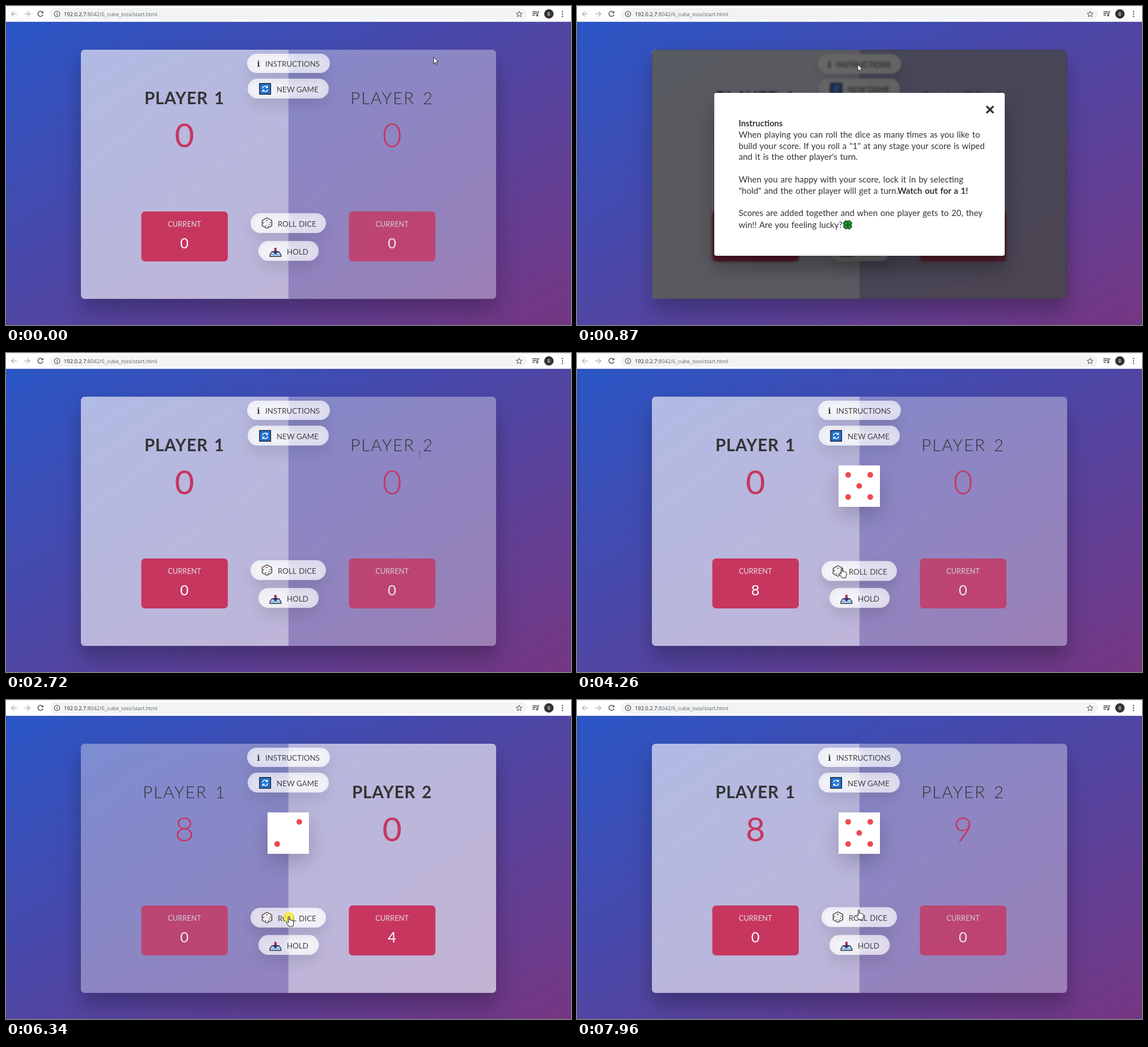
An HTML page for the animation above (8000 ms loop, 996 by 562 pixels).

```html
<!DOCTYPE html>
<html lang="en">
<head>
<meta charset="utf-8">
<title>Dice game</title>
<style>
html, body { margin: 0; width: 100%; height: 100%; overflow: hidden; }
#stage { position: relative; width: 996px; height: 562px; overflow: hidden; background: #fff; font-family: Lato, "Open Sans", sans-serif; }
#stage div, #stage svg { position: absolute; box-sizing: border-box; }
svg { overflow: visible; pointer-events: none; }
svg text { white-space: pre; }
.full { left: 0; top: 0; width: 996px; height: 562px; }
#page { left: 0; top: 28px; width: 996px; height: 534px; background: linear-gradient(to top left, #753682, #2a56c6); }
#main { left: 131.5px; top: 77px; width: 732px; height: 439px; overflow: hidden; border-radius: 6.6px;
  background: rgba(255,255,255,.35); backdrop-filter: blur(146px); }
#shade { left: 131.5px; top: 77px; width: 732px; height: 439px; border-radius: 6.6px; box-shadow: 0 22px 36.6px rgba(0,0,0,.25); }
.panel { top: 0; width: 366px; height: 439px; }
.btn { border-radius: 40px; background: rgba(255,255,255,.6); backdrop-filter: blur(7.3px); }
.btn text { font-size: 13.4px; fill: #444; }
#dice { left: 329.5px; top: 120.5px; width: 73px; height: 73px; background: #fff; box-shadow: 0 14.6px 36.6px rgba(0,0,0,.2); }
#overlay { inset: 0; background: rgba(0,0,0,.6); backdrop-filter: blur(2.2px); }
#modal { left: 110px; top: 76px; width: 512px; height: 287px; border-radius: 3.7px; background: #fff; box-shadow: 0 22px 36.6px rgba(0,0,0,.3); }
#modal text { font-size: 15px; word-spacing: 1px; fill: #333; }
.b { font-weight: 700; }
.name { font-size: 29.6px; fill: #333; text-anchor: middle; }
.score { font-size: 59px; fill: #c7365f; text-anchor: middle; }
.label { font-size: 12.8px; fill: #ddd; text-anchor: middle; }
.now { font-size: 25.6px; fill: #fff; text-anchor: middle; }
</style>
</head>
<body>
<div id="stage"></div>
<script>
const stage = document.getElementById('stage');
const $ = id => document.getElementById(id);

// Layers keep stage coordinates whatever box they sit in.
const layer = (x, y, body, id = '') =>
  `<svg id="${id}" class="full" style="left:${-x}px;top:${-y}px" viewBox="0 0 996 562">${body}</svg>`;
const text = (x, y, s, attrs = '') => `<text x="${x}" y="${y}" ${attrs}>${s}</text>`;
const dot = (x, y, r, fill) => `<circle cx="${x}" cy="${y}" r="${r}" fill="${fill}"/>`;

const toolbar = `
  <path d="M0 .5H996" stroke="#e4e6e8"/><path d="M0 27.5H996" stroke="#dfe1e5"/>
  <rect x="77" y="3.5" width="841" height="20.5" rx="10.2" fill="#f1f3f4"/>
  <g fill="none" stroke="#b4b7ba" stroke-width="1.4">
    <path d="M19 14H9.6M14 9.4L9.4 14L14 18.6"/><path d="M32.500 14H42M37.500 9.400L42.100 14L37.500 18.600"/>
  </g>
  <g fill="none" stroke="#4d5156" stroke-width="1.400">
    <path d="M64.300 10.900A4.500 4.500 0 1 0 65.200 15"/><path d="M65.800 8.800V12.800H61.800Z" fill="#4d5156" stroke="none"/>
    <circle cx="90" cy="14" r="4.800" stroke-width="1.100"/><path d="M90 13.300V16.700M90 11.200V12.400" stroke-width="1.200"/>
    <path d="M904.500 9L906 12.500L909.700 12.800L906.900 15.200L907.800 18.800L904.500 16.900L901.200 18.800L902.100 15.200L899.300 12.800L903 12.500Z" stroke-width="1"/>
    <path d="M928 10.300H936M928 13.300H936M928 16.300H932.500M937.500 16.500V10.300H940"/>
  </g>
  ${dot(936.2, 16.700, 1.700, '#4d5156')}
  <text x="102" y="17.500" font-family="Open Sans, Noto Sans, sans-serif" font-size="9.300" fill="#5f6368"><tspan fill="#202124">192.0.2.7</tspan>:8042/6_cube_toss/start.html</text>
  ${dot(957, 14, 8.300, '#333')}
  <text x="957" y="16.800" font-size="7.500" fill="#fff" text-anchor="middle">B</text>
  ${[9.8, 14, 18.2].map(y => dot(981, y, 1.200, '#4d5156')).join('')}`;

const icons = {
  info: `<text x="442.500" y="107" style="font:700 15px 'Noto Serif',serif;fill:#333">i</text>`,
  reload: `<rect x="447" y="136.500" width="19.500" height="19" fill="#2173d4" stroke="#111" stroke-width="1.300"/>
    <g fill="none" stroke="#fff" stroke-width="1.400"><path d="M452 145A4.800 4.800 0 0 1 460.500 143.200M461.500 147A4.800 4.800 0 0 1 453 148.900"/>
    <path d="M461 140.500V143.800H457.700M452.500 151.600V148.300H455.800"/></g>`,
  die: `<path d="M460 373.300L468.500 377.800V387.200L460 391.800L451.600 387.200V377.800Z" fill="#fff" stroke="#222" stroke-width="1.300" stroke-linejoin="round"/>
    <path d="M451.600 377.800L460 382.300L468.500 377.800M460 382.300V391.800" fill="none" stroke="#aaa" stroke-width=".6"/>
    ${dot(460, 377.800, 1.300, '#d22')}
    ${[[454, 382], [457.500, 387.500], [462.500, 388], [466, 381.500], [464.300, 384.800]].map(p => dot(...p, .9, '#222')).join('')}`,
  tray: `<path d="M468.500 433H481.500L484.800 438V441.300H465.200V438Z" fill="#a9d3f5" stroke="#222" stroke-width="1.300" stroke-linejoin="round"/>
    <path d="M466 438.300H484" stroke="#6fa6d8"/>
    <path d="M473.300 426.500H476.700V432.500H479.800L475 437.500L470.200 432.500H473.300Z" fill="#4a2a86" stroke="#222" stroke-width=".6"/>
    <path d="M473.300 426.500H476.700V431H473.300Z" fill="#cf2d4c"/>`
};

const buttons = {
  info: [424.5, 84, 146, 34, icons.info + text(457, 107, 'INSTRUCTIONS')],
  fresh: [426, 128, 143, 35, icons.reload + text(477, 152, 'NEW GAME')],
  roll: [431, 364.7, 133, 35, icons.die + text(479, 388.5, 'ROLL DICE', 'word-spacing="1.500"')],
  hold: [444.5, 414.4, 106.5, 35, icons.tray + text(495, 438.300, 'HOLD')]
};

const button = ([id, [x, y, w, h, body]]) =>
  `<div class="btn" id="${id}" style="left:${x - 131.5}px;top:${y - 77}px;width:${w}px;height:${h}px">${layer(x, y, body)}</div>`;

const player = i => {
  const x = 314.5 + 366 * i;
  return text(x, 172.500, `PLAYER ${i + 1}`, `class="name" id="name${i}"`)
    + text(x, 248.700, 0, `class="score" id="score${i}"`)
    + `<g id="box${i}"><rect x="${x - 76}" y="362" width="152.500" height="88" rx="6.600" fill="#c7365f"/>`
    + text(x, 389, 'CURRENT', 'class="label"')
    + text(x, 427, 0, `class="now" id="now${i}"`) + '</g>';
};

const lines = [
  [212, '<tspan class="b" font-size="14.600">Instructions</tspan>'],
  [231.7, 'When playing you can roll the dice as many times as you like to'],
  [251.5, 'build your score. If you roll a "1" at any stage your score is wiped'],
  [271.2, "and it is the other player's turn."],
  [310.7, 'When you are happy with your score, lock it in by selecting'],
  [330.5, '"hold" and the other player will get a turn. <tspan class="b" x="565">Watch out for a 1!</tspan>'],
  [370, 'Scores are added together and when one player gets to 20, they'],
  [391, 'win!! Are you feeling lucky?']
];

const leaf = a => `<path transform="translate(477 385.500) rotate(${a})" d="M0 0C-4-2-5-5-3.500-7C-2-8.700-.5-7.800 0-7C.5-7.800 2-8.700 3.500-7C5-5 4-2 0 0Z" fill="#1e8f2e" stroke="#143d18" stroke-width="1"/>`;

const modalBody = lines.map(([y, s]) => text(285, y, s)).join('')
  + `<path d="M477 385.500Q478 391 481 393.500" fill="none" stroke="#143d18" stroke-width="1.500"/>`
  + [45, 135, 225, 315].map(leaf).join('')
  + `<path d="M721.800 176.500L734.200 188.500M734.200 176.500L721.800 188.500" stroke="#333" stroke-width="3.200"/>
     <rect id="focus" x="717" y="162" width="22.500" height="42.500" rx="2" fill="none" stroke="#101010" stroke-width="2"/>`;

const cursors = `
  <circle id="click" r="9.300" fill="#f7e93a" opacity=".88"/>
  <g id="cursor" stroke="#111" stroke-linejoin="round">
    <path id="arrow" d="M0 0V11.500L2.700 9.100L4.600 13.300L6.500 12.500L4.700 8.400H8Z" fill="#fff" stroke-width=".9"/>
    <path id="hand" d="M-1.200 .8C-1.200-.6 1-.6 1 .8V6C1.200 5 3.400 5 3.600 6.400C4.200 5.600 5.800 6 6 7.200C6.800 6.600 8 7 8 8.400V12L6.600 17H0L-4.600 10.600C-5.400 9.200-3.800 8-2.600 9.200L-1.200 10.600Z" fill="#fff" stroke-width="1"/>
    <path id="beam" d="M-2-6H2M0-6V6M-2 6H2" fill="none" stroke="#555" stroke-width=".8"/>
  </g>`;

stage.innerHTML = `<div id="page"></div><div id="shade"></div>
  <div id="main">
    <div class="panel" id="panel0" style="left:0"></div><div class="panel" id="panel1" style="left:366px"></div>
    ${layer(131.5, 77, player(0) + player(1))}
    <div id="dice">${layer(461, 197.5, '', 'pips')}</div>
    ${Object.entries(buttons).map(button).join('')}
    <div id="overlay"></div>
    <div id="modal">${layer(241.5, 153, modalBody)}</div>
  </div>
  ${layer(0, 0, toolbar)}${layer(0, 0, cursors)}`;

const LOOP = 8000;
const clamp = v => Math.min(1, Math.max(0, v));
const mix = (a, b, k) => a + (b - a) * k;

// The CSS "ease" curve, cubic-bezier(.25, .1, .25, 1).
function ease(x) {
  x = clamp(x);
  let lo = 0, hi = 1;
  for (let i = 0; i < 20; i++) {
    const s = (lo + hi) / 2, bx = .75 * s * (1 - s) + s ** 3;
    if (bx < x) lo = s; else hi = s;
  }
  return .3 * lo * (1 - lo) ** 2 + 3 * lo * lo * (1 - lo) + lo ** 3;
}

const clicks = [
  ['info', 780, 850], ['close', 2630, 2715], ['roll', 3490, 3640], ['roll', 4100, 4225], ['hold', 4630, 4670],
  ['roll', 5490, 5600], ['roll', 5900, 6010], ['roll', 6290, 6410], ['hold', 6970, 7030]
];

// time, active player, totals, current scores, die face
const states = [
  [0, 0, [0, 0], [0, 0], 0], [3640, 0, [0, 0], [3, 0], 3], [4225, 0, [0, 0], [8, 0], 5],
  [4670, 1, [8, 0], [0, 0], 5], [5600, 1, [8, 0], [0, 2], 2], [6010, 1, [8, 0], [0, 4], 2],
  [6410, 1, [8, 0], [0, 9], 5], [7030, 0, [8, 9], [0, 0], 5]
];

const path = [
  [0, 754, 90], [70, 754, 90], [380, 495, 105], [850, 495, 105], [870, 495, 103], [1800, 495, 103],
  [2490, 728, 179], [2720, 729, 179], [2790, 729, 179], [3410, 467, 380], [4225, 467, 379], [4270, 467, 379],
  [4410, 469, 418], [4700, 469, 418], [5300, 499, 382], [6410, 499, 382], [6520, 499, 382],
  [6800, 499, 424], [7500, 499, 424], [7960, 497, 370], [LOOP, 497, 370]
];

function cursorAt(t) {
  const i = Math.max(1, path.findIndex(p => p[0] > t));
  const [t0, x0, y0] = path[i - 1], [t1, x1, y1] = path[i];
  const k = clamp((t - t0) / (t1 - t0)), s = k * k * (3 - 2 * k);
  return [mix(x0, x1, s), mix(y0, y1, s)];
}

const inside = (x, y, [bx, by, w, h]) => x >= bx && x <= bx + w && y >= by && y <= by + h;

function cursorKind(x, y, open) {
  if (open) {
    if (inside(x, y, [717, 162, 23, 43])) return 'hand';
    return inside(x, y, [285, 197, 425, 200]) ? 'beam' : 'arrow';
  }
  if (Object.values(buttons).some(b => inside(x, y, b))) return 'hand';
  return inside(x, y, [610, 142, 140, 40]) || inside(x, y, [664, 195, 32, 70]) ? 'beam' : 'arrow';
}

function pressAt(id, t) {
  const c = clicks.filter(c => c[0] === id && c[1] <= t).pop();
  if (!c) return 0;
  const down = ease((Math.min(t, c[2]) - c[1]) / 200);
  return t < c[2] ? down : down * (1 - ease((t - c[2]) / 200));
}

const pips = n => {
  const at = [[-1, 1], [1, -1], [-1, -1], [1, 1]].slice(0, n & ~1);
  if (n & 1) at.push([0, 0]);
  return at.map(([x, y]) => dot(497.5 + x * 19.5, 234.2 + y * 19.5, 5, '#ee4a4d')).join('');
};

const show = (id, on) => { $(id).style.display = on ? '' : 'none'; };

let face = -1;
function draw(t) {
  const [, active, totals, now, die] = states.filter(s => s[0] <= t).pop();
  const second = ease((t - 4670) / 750) - ease((t - 7030) / 750);
  [1 - second, second].forEach((k, i) => {
    const on = i === active, name = $('name' + i), score = $('score' + i);
    $('panel' + i).style.background = `rgba(255,255,255,${.4 * k})`;
    $('box' + i).style.opacity = mix(.8, 1, k);
    name.style.cssText = on ? 'font-weight:700;letter-spacing:.8px;word-spacing:3px'
      : 'font-weight:300;letter-spacing:1.9px;word-spacing:4px';
    score.style.fontWeight = on ? 400 : 300;
    score.textContent = totals[i];
    $('now' + i).textContent = now[i];
  });

  if (die !== face) {
    face = die;
    show('dice', die);
    $('pips').innerHTML = pips(die);
  }

  for (const id in buttons) {
    const p = pressAt(id, t), st = $(id).style;
    st.transform = p ? `translateY(${2.2 * p}px)` : 'none';
    st.boxShadow = `0 ${mix(12.8, 7.3, p)}px ${mix(25.6, 14.6, p)}px rgba(0,0,0,${mix(.1, .15, p)})`;
  }

  const open = t >= 850 && t < 2715;
  show('overlay', open);
  show('modal', open);
  show('focus', t >= 2630);

  const [x, y] = cursorAt(t);
  const kind = t > 850 && t < 1800 ? 'arrow' : cursorKind(x, y, open);
  ['arrow', 'hand', 'beam'].forEach(k => show(k, k === kind));
  $('cursor').setAttribute('transform', `translate(${x} ${y})`);
  $('click').setAttribute('transform', `translate(${x - .5} ${y + .5})`);
  show('click', clicks.some(c => t >= c[1] && t < c[2]));
}

const start = performance.now();
function tick() {
  draw((performance.now() - start) % LOOP);
  requestAnimationFrame(tick);
}
tick();
</script>
</body>
</html>
```
